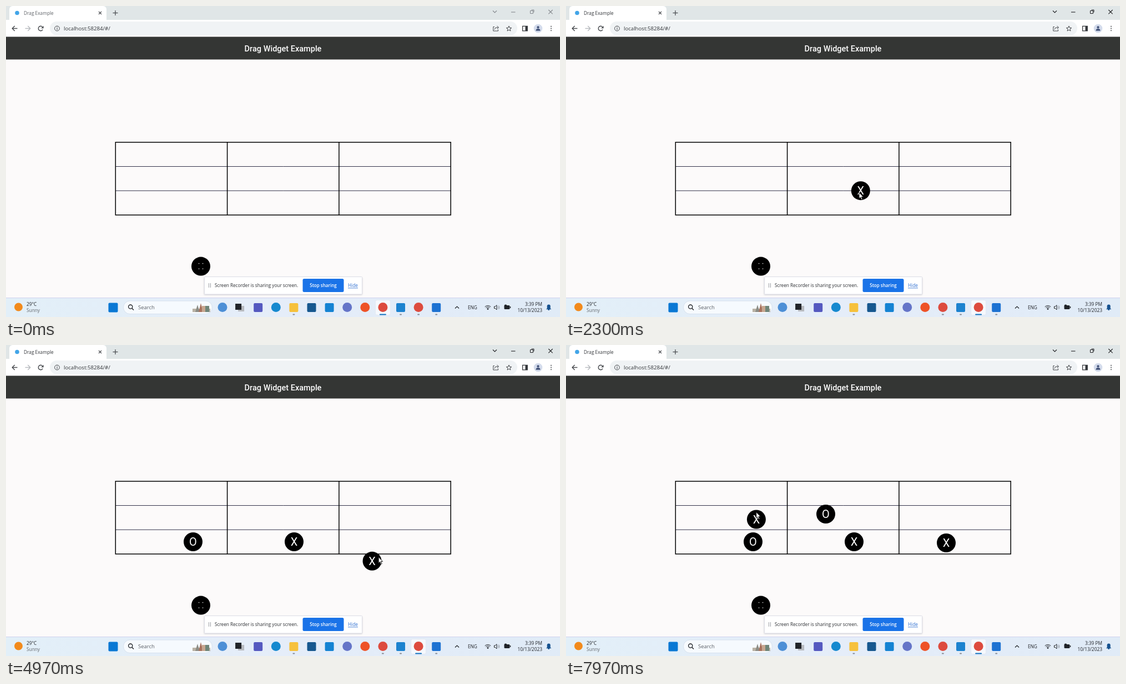
Recreate the animation shown at these times as an HTML page with a canvas. Size 998 px wide and 561 px high, loop 8000 ms.

```html
<!DOCTYPE html>
<html lang="en">
<head>
<meta charset="utf-8">
<title>Drag Example</title>
<style>
  html, body { margin: 0; width: 100%; height: 100%; overflow: hidden; background: #fcfafa; }
  canvas { display: block; }
</style>
</head>
<body>
<canvas id="stage" width="998" height="561"></canvas>
<script>
const g = document.getElementById('stage').getContext('2d');
const LOOP = 8000, ACTIVATE = 1890;
const LAG = 40;                      // a token trails the pointer
const PAUSE = 60, HOVER = 140;       // rests after a drop and before a grab
const UI = '"Open Sans", "Noto Sans", sans-serif';
const ROBOTO = 'Roboto, Arial, sans-serif';
const INK = '#202328', ICON = '#44474b';
const HOME = { x: 351, y: 467 };

// sag bends the way down (or up), over makes it shoot past its end
const DRAGS = [
  { label: 'X', x: 519, y: 353, grab: 1870, settle: 2430, sag: -17, over: 1.54 },
  { label: 'O', x: 337, y: 353, grab: 3450, settle: 4130, sag: 7, over: 1.54 },
  { label: 'X', x: 685, y: 355, grab: 4620, settle: 5160, sag: 25, over: 0 },
  { label: 'O', x: 468, y: 303, grab: 6150, settle: 6960, sag: 35, over: 0 },
  { label: 'X', x: 338, y: 219, grab: 7570, settle: 8870, sag: 0, over: 0 }
];

const linear = s => s;
const smooth = s => s * s * (3 - 2 * s);
const settleTo = over => s => 1 + (over + 1) * (s - 1) ** 3 + over * (s - 1) ** 2;

const LEGS = buildLegs();

function buildLegs() {
  const edge = { x: 998, y: 425 }, mid = { x: 603, y: 328 };
  const legs = [
    { start: 570, end: 970, from: edge, to: mid, sag: 0, ease: linear },
    { start: 970, end: 1730, from: mid, to: HOME, sag: -45, ease: settleTo(0) }
  ];
  DRAGS.forEach((d, i) => {
    legs.push({ start: d.grab, end: d.settle, from: HOME, to: d, sag: d.sag, ease: settleTo(d.over) });
    const next = DRAGS[i + 1];
    if (next) legs.push({
      start: d.settle + PAUSE, end: next.grab - HOVER, from: d, to: HOME,
      sag: 0.12 * Math.abs(d.x - HOME.x), ease: smooth
    });
  });
  return legs;
}

function pointer(t) {
  const leg = LEGS.findLast(l => l.start <= t) || LEGS[0];
  const { start, end, from, to, sag } = leg;
  const s = Math.min(1, Math.max(0, (t - start) / (end - start))), e = leg.ease(s);
  return {
    x: from.x + (to.x - from.x) * e,
    y: from.y + (to.y - from.y) * e + sag * Math.sin(Math.PI * s)
  };
}

function rect(x, y, w, h, color) {
  g.fillStyle = color;
  g.fillRect(x, y, w, h);
}

function round(x, y, w, h, r, color, edge) {
  g.beginPath();
  g.roundRect(x, y, w, h, r);
  g.fillStyle = color;
  g.fill();
  if (edge) stroke(edge, 1);
}

function stroke(color, width) {
  g.strokeStyle = color;
  g.lineWidth = width;
  g.stroke();
}

function box(x, y, w, h, color, width) {
  g.beginPath();
  g.rect(x, y, w, h);
  stroke(color, width);
}

function disc(x, y, r, color, from = 0, to = 7) {
  g.beginPath();
  g.arc(x, y, r, from, to);
  g.fillStyle = color;
  g.fill();
}

function ring(x, y, r, color, width = 1, from = 0, to = 7) {
  g.beginPath();
  g.arc(x, y, r, from, to);
  stroke(color, width);
}

function trace(...p) {
  g.beginPath();
  for (let i = 0; i < p.length; i += 2) g.lineTo(p[i], p[i + 1]);
}

function line(color, width, ...p) {
  trace(...p);
  stroke(color, width);
}

function shape(color, ...p) {
  trace(...p);
  g.closePath();
  g.fillStyle = color;
  g.fill();
}

// Two-armed arrowhead, pointing along (dx, dy)
function chevron(x, y, dx, dy, size, color, width) {
  line(color, width, x - size * (dx + dy), y - size * (dy + dx), x, y,
    x - size * (dx - dy), y - size * (dy - dx));
}

function cross(x, y, r, color) {
  line(color, 1.1, x - r, y - r, x + r, y + r);
  line(color, 1.1, x - r, y + r, x + r, y - r);
}

function text(str, x, y, size, color, { font = UI, weight = 400, align = 'left' } = {}) {
  g.font = `${weight} ${size}px ${font}`;
  g.textAlign = align;
  g.fillStyle = color;
  g.fillText(str, x, y);
}

function tabStrip(active) {
  const ink = active ? '#202124' : '#85898e';
  rect(0, 0, 998, 25, '#e0e6e7');
  round(6, 0, 175, 31, 6, '#fff');
  disc(20, 12.5, 3.8, '#42a5e8');
  text('Drag Example', 32, 15.5, 8.3, active ? '#33363a' : '#5f6368');
  cross(169.5, 12.5, 2.5, ICON);
  rect(192.5, 11.9, 9, 1.2, ICON);
  rect(196.4, 8, 1.2, 9, ICON);
  chevron(880.5, 12, 0, 1, 3.5, ink, 1.1);
  rect(910, 10.5, 7.5, 1.1, ink);
  box(944.5, 8.5, 5, 5, ink, 1);
  line(ink, 1, 946.5, 7, 951, 7, 951, 11.5);
  cross(981, 10.7, 3.7, ink);
}

function star(x, y, r) {
  g.beginPath();
  for (let i = 0; i < 10; i++) {
    const a = (i / 5 - 0.5) * Math.PI, d = i % 2 ? r * 0.42 : r;
    g.lineTo(x + d * Math.cos(a), y + d * Math.sin(a));
  }
  g.closePath();
  stroke(ICON, 1);
}

function toolbar() {
  const mid = 40.5;
  rect(0, 25, 998, 31, '#fff');
  for (const [tip, dir, color] of [[11.3, -1, ICON], [43.7, 1, '#b6b9bd']]) {
    chevron(tip, mid, dir, 0, 4.4, color, 1.4);
    line(color, 1.4, tip, mid, tip - 9.2 * dir, mid);
  }
  ring(62.5, mid, 4.2, ICON, 1.4, 0.5, 5.5);
  shape(ICON, 67.6, 35.8, 67.6, 40.2, 63.2, 40.2);

  round(79, 28, 842, 24.5, 12.2, '#f0f3f5');
  ring(92, mid, 4.4, ICON);
  rect(91.5, 39.8, 1.1, 3.2, ICON);
  rect(91.5, 37.8, 1.1, 1.2, ICON);
  text('localhost:58284/#/', 104, 44, 9.65, '#33363a');

  line(ICON, 1, 880, 37.5, 877.8, 37.5, 877.8, 45, 886.5, 45, 886.5, 42.5);
  line(ICON, 1, 880, 42.5, 882, 39, 887, 38.8);
  chevron(887.5, 38.8, 1, 0, 2.8, ICON, 1);
  star(906, 41, 5);
  box(930.6, 36.4, 8.6, 8.4, '#33363a', 1.3);
  rect(935.5, 36, 4, 9, '#33363a');
  disc(958.5, mid, 7.8, '#d4dcec');
  disc(958.5, 38.3, 2.1, '#45557a');
  disc(958.5, 44.8, 4, '#45557a', Math.PI, 0);
  for (const dy of [-3.7, 0, 3.7]) disc(982, mid + dy, 0.95, ICON);
}

function ball(x, y) {
  disc(x, y, 17, '#000');
}

function page() {
  rect(0, 55.5, 998, 471, '#fcfafa');
  rect(0, 55.5, 998, 41, '#343634');
  text('Drag Widget Example', 499, 82, 14.5, '#fff', { font: ROBOTO, weight: 500, align: 'center' });

  const x = 197.3, y = 245.8, w = 201.3, h = 43.7;
  for (const i of [1, 2]) line('#33334a', 1, x, y + i * h, x + 3 * w, y + i * h);
  for (const i of [1, 2]) line('#000', 1.5, x + i * w, y, x + i * w, y + 3 * h);
  box(x, y, 3 * w, 3 * h, '#000', 1.5);

  ball(HOME.x, HOME.y + 2.6);
  for (const dx of [-3.5, 3.5])
    for (const dy of [-2.5, 7]) rect(HOME.x + dx - 0.6, HOME.y + dy - 0.6, 1.3, 1.3, '#fff');
}

function shareBar() {
  g.save();
  g.shadowColor = 'rgba(60,64,80,.28)';
  g.shadowBlur = 3;
  g.shadowOffsetY = 1;
  round(357, 489, 284.5, 31, 1, '#fff');
  g.restore();
  round(357.5, 488.5, 284, 31.5, 1, '#fff', '#dcdde6');
  for (const x of [365, 368]) rect(x, 500, 1, 8, '#9a9da3');
  text('Screen Recorder is sharing your screen.', 376, 507, 8.2, '#2a2d31');
  round(534.5, 492, 74, 24, 2.5, '#1a73e8');
  text('Stop sharing', 571.5, 507, 8.05, '#fff', { weight: 600, align: 'center' });
  text('Hide', 616, 507, 8.3, '#2f6fd0');
  rect(616, 508.5, 18, 0.8, '#2f6fd0');
}

function searchBox() {
  round(211.5, 532, 160, 23.5, 11.7, '#f6fafe', '#d7e1ee');
  ring(224.2, 542.6, 3.6, INK, 1.3);
  line(INK, 1.4, 226.8, 545.3, 230, 548.6);
  text('Search', 238, 547.3, 9.5, '#5c6067');
  rect(336, 546, 32, 6, '#b9b2a5');
  ['#8c8d86', '#a9735f', '#c7a790', '#6f8578'].forEach((color, i) => {
    const x = 345 + 6 * i;
    if (i < 2) shape(color, x - 4, 552, x, 539 - 3 * i, x + 4, 552);
    else rect(x - 4, 541, 7, 11, color);
  });
}

// Round ones start with "o", square ones with "s"; "-" is the task switcher
const APPS = ['o#4d8fd6', '-', 's#5559c0', 'o#1689cf', 's#f6c13c', 's#17588f', 's#1583d3',
  'o#6575c8', 'o#ee5327', 'o#dd4b3e', 's#1c82cf', 'o#dd4b3e', 's#1d72d2'];
const RUNNING = [4, 9, 10, 11, 12];

function taskbar(active) {
  const bg = g.createLinearGradient(0, 0, 998, 0);
  bg.addColorStop(0, '#e2eff8');
  bg.addColorStop(0.5, '#e5edf9');
  bg.addColorStop(1, '#e0ebf7');
  rect(0, 526, 998, 35, bg);
  rect(0, 526, 998, 1, '#cfd2ee');
  disc(22.5, 543, 7.5, '#f28a1c');
  text('29°C', 37, 541, 8.3, INK);
  text('Sunny', 37, 552, 8.3, '#62666c');
  searchBox();
  round(184.5, 535.5, 17, 17, 2, '#0a78d4');

  const focus = active ? 11 : 9;
  APPS.forEach((app, i) => {
    const x = 390 + 32.1 * i, color = app.slice(1), focused = i === focus;
    if (focused) round(x - 13.5, 530.5, 27, 27, 3, '#f5f8fd', '#e3e8f2');
    if (app === '-') {
      rect(x - 4, 541, 11, 10, '#b8bbc0');
      rect(x - 9, 537, 11, 11, INK);
    } else if (app[0] === 'o') disc(x, 543.5, 8.5, color);
    else round(x - 8, 536, 16, 16, 2, color);
    if (RUNNING.includes(i)) {
      const w = focused ? 12 : 4;
      round(x - w / 2, 555.4, w, 2, 1, focused ? '#1271bd' : '#878c94');
    }
  });
  tray();
}

function tray() {
  chevron(812.5, 542, 0, -1, 3.5, INK, 1.2);
  text('ENG', 832, 547, 8.3, INK);
  for (const r of [2.5, 5, 7.5]) ring(868, 548, r, INK, 1, -2.35, -0.8);
  disc(868, 547, 1.1, INK);
  line(INK, 1, 884, 539.6, 884, 548, 881.5, 545.5, 879.5, 545.5, 879.5, 542, 881.5, 542, 884, 539.6);
  for (const r of [2.6, 4.5]) ring(884.3, 543.8, r, '#858a91', 0.9, -0.9, 0.9);
  round(897.5, 540, 10, 7, 1.5, INK);
  rect(908, 542, 1.2, 3, INK);
  disc(900, 541, 2.4, INK);
  text('3:39 PM', 966, 541, 8.3, INK, { align: 'right' });
  text('10/13/2023', 966, 552, 8.4, INK, { align: 'right' });
  round(974.7, 538.5, 6, 8, [3, 3, 0, 0], '#17528f');
  rect(973.5, 546, 8.4, 1.2, '#17528f');
  disc(977.7, 547.6, 1.5, '#17528f');
}

function tokens(t) {
  for (const { label, grab, settle } of DRAGS) {
    if (t < grab + LAG) continue;
    const p = pointer(Math.min(t - LAG, settle));
    ball(p.x, p.y + 2);
    text(label, p.x, p.y + 9.2, 20, '#fff', { font: ROBOTO, align: 'center' });
  }
}

function arrow(t) {
  if (t < LEGS[0].start) return;
  const { x, y } = pointer(t);
  g.save();
  g.translate(x, y);
  g.lineJoin = 'round';
  shape('#fff', 0.5, 0.5, 0.5, 11.3, 2.9, 9, 4.7, 13.3, 6.5, 12.5, 4.7, 8.4, 8, 8.4);
  stroke('#111', 0.9);
  g.restore();
}

function draw(now) {
  const t = now % LOOP, active = t >= ACTIVATE;
  tabStrip(active);
  toolbar();
  page();
  tokens(t);
  shareBar();
  taskbar(active);
  arrow(t);
  requestAnimationFrame(draw);
}
requestAnimationFrame(draw);
</script>
</body>
</html>
```
